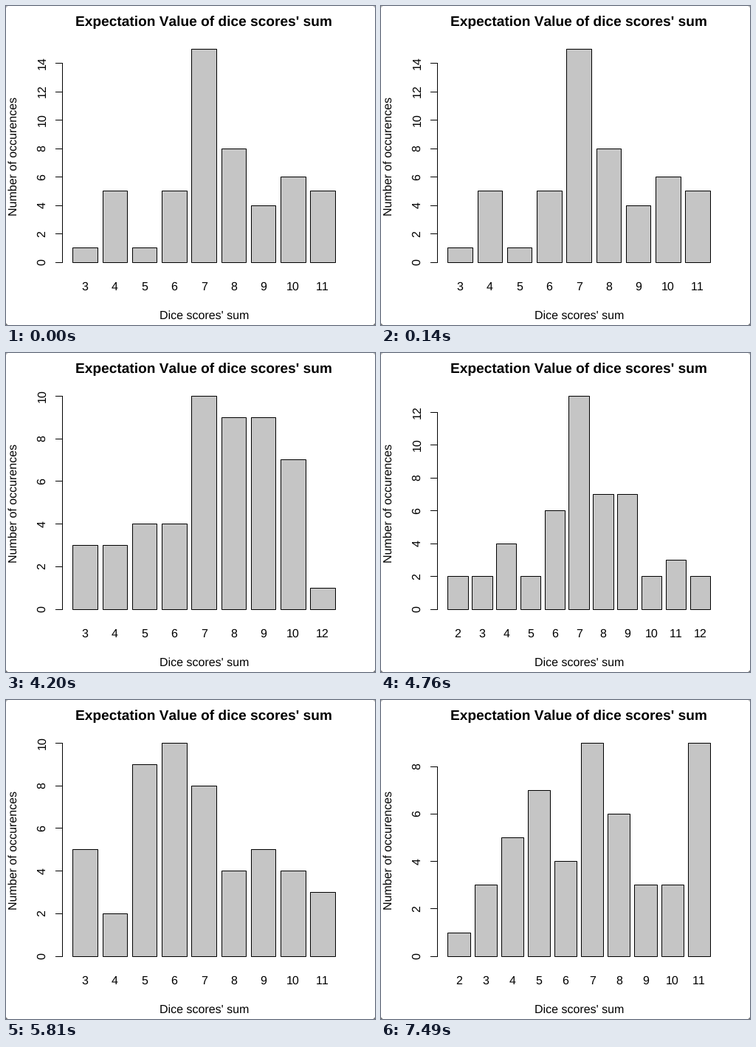
Animation of 500 by 432 pixels, one loop 8 s. Source, as a matplotlib script:

```python
import matplotlib.pyplot as plt
from matplotlib.animation import FuncAnimation
from matplotlib.patches import Polygon, Rectangle

W, H, DPI = 500, 432, 100
STEP, LOOP = 10, 8000
FIRST, HOLD = 3850, 910            # ms until the first change, then between changes
PX = 72 / DPI                      # points per pixel
LEFT, RIGHT = 90.4, 445.9          # outer edges of the bars
BASE, TOP = 346.7, 57.7            # zero line and tallest bar
AXIS, TICK = 76.3, 66.7
MID = 268.3

plt.rcParams.update({
    "font.family": "Liberation Sans",
    "text.hinting": "none",
    "text.kerning_factor": 6,
    "toolbar": "None",
})

# Each row: how often 50 throws of two dice gave the sums 2, 3, ... 12
THROWS = [
    [0, 1, 5, 1, 5, 15, 8, 4, 6, 5, 0],
    [0, 3, 3, 4, 4, 10, 9, 9, 7, 0, 1],
    [2, 2, 4, 2, 6, 13, 7, 7, 2, 3, 2],
    [0, 5, 2, 9, 10, 8, 4, 5, 4, 3, 0],
    [1, 4, 5, 4, 9, 12, 5, 2, 3, 1, 4],
    [1, 3, 5, 7, 4, 9, 6, 3, 3, 9, 0],
]

fig = plt.figure(figsize=(W / DPI, H / DPI), dpi=DPI, facecolor="white")
ax = fig.add_axes([0, 0, 1, 1])
ax.set_xlim(0, W)
ax.set_ylim(H, 0)
ax.axis("off")


def label(x, y, text, size=16, turn=0, weight="normal"):
    return ax.text(x, y, text, fontsize=size * PX, rotation=turn,
                   rotation_mode="anchor", ha="center", va="baseline",
                   weight=weight, color="black")


def line(xs, ys):
    return ax.plot(xs, ys, color="black", lw=PX, solid_capstyle="projecting")[0]


def build(counts):
    """Draw one bar chart, leaving out sums that never came up."""
    seen = [(total, n) for total, n in enumerate(counts, 2) if n]
    peak = max(counts)
    width = (RIGHT - LEFT) / (1.2 * len(seen) - 0.2)
    scale = (BASE - TOP) / peak
    parts = []
    for i, (total, n) in enumerate(seen):
        x = LEFT + 1.2 * width * i
        bar = Rectangle((x, BASE), width, -n * scale,
                        fc="#c5c5c5", ec="black", lw=PX)
        parts += [ax.add_patch(bar), label(x + width / 2, 385, str(total))]
    for value in range(0, peak + 1, 2):
        y = BASE - value * scale
        parts += [line([TICK, AXIS], [y, y]),
                  label(53.5, y, str(value), turn=90)]
    parts.append(line([AXIS, AXIS], [BASE, y]))
    return parts


def corner(x, y, dx, dy, color):
    ax.add_patch(Polygon([(x, y), (x + dx, y), (x, y + dy)], fc=color, lw=0))


label(MID, 27, "Expectation Value of dice scores' sum", 19.2, weight="bold")
label(MID, 424, "Dice scores' sum")
label(15, 203.7, "Number of occurences", turn=90)
for x, dx in ((0, 2.5), (W, -2.5)):
    corner(x, 0, dx, 2.5, "#bbbbbb")
    corner(x, H, dx, -2.5, "#777777")

charts = [build(counts) for counts in THROWS]


def update(i):
    now = max(0, (i * STEP - FIRST) // HOLD + 1)
    for k, chart in enumerate(charts):
        for part in chart:
            part.set_visible(k == now)
    return charts[now]


anim = FuncAnimation(fig, update, frames=LOOP // STEP, interval=STEP,
                     init_func=lambda: update(0), repeat=True, repeat_delay=0)
plt.show()
```
